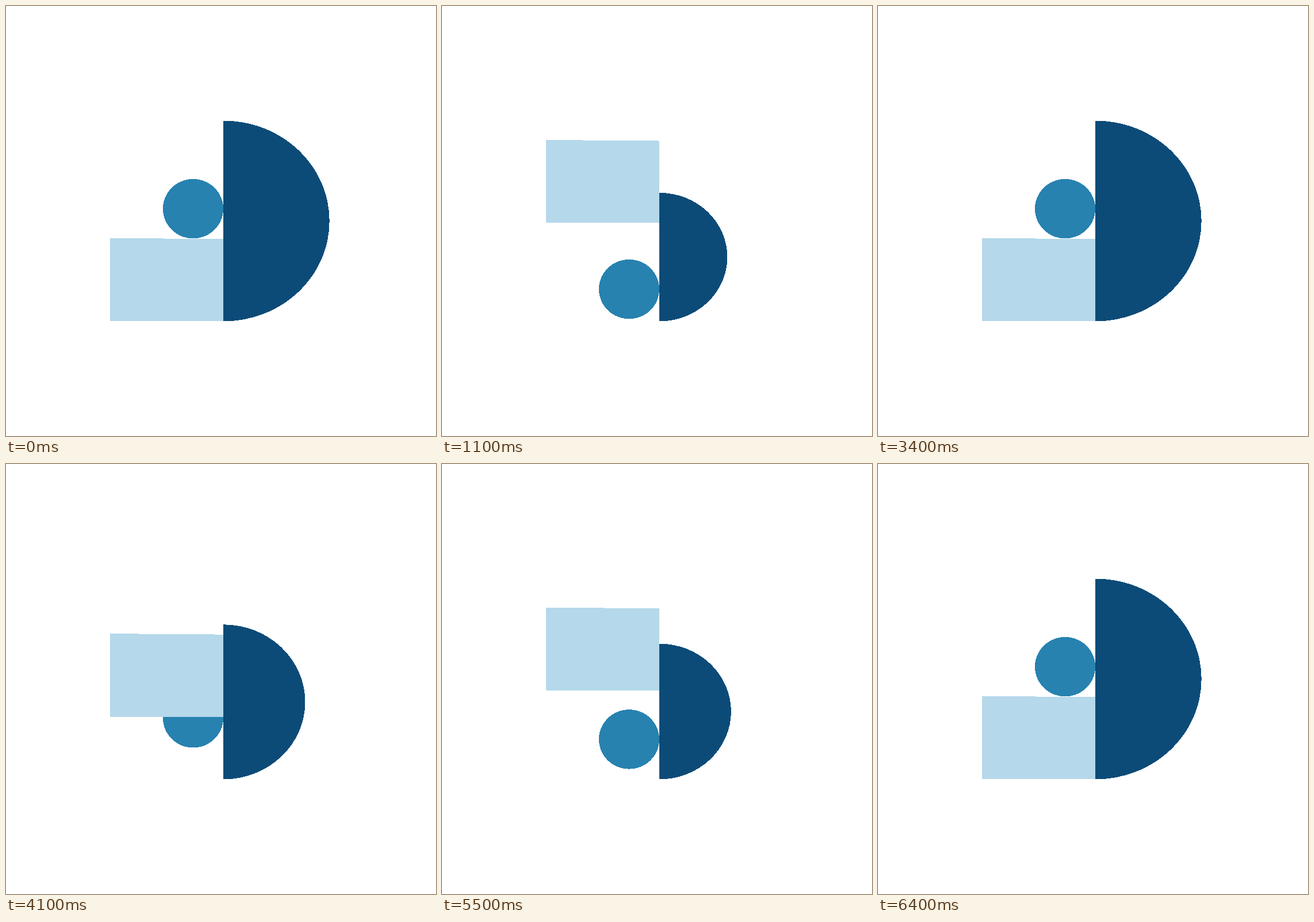
Write an HTML page that moves like this. It is 748 px wide and 748 px high and loops after 6810 ms.

```html
<!DOCTYPE html>
<html lang="en">
<head>
<meta charset="utf-8">
<title>Balancing shapes</title>
<style>
  html, body { margin: 0; width: 100%; height: 100%; overflow: hidden; background: #fff; }
  svg { display: block; width: 100%; height: 100%; }
</style>
</head>
<body>
<svg viewBox="0 0 748 748" shape-rendering="crispEdges">
  <ellipse id="ball" cx="325.5" cy="352.7" rx="52.6" ry="51.7" fill="#2782b0"/>
  <path id="block" d="M181.4 403.8 L378.2 405.3 V548.2 H181.4 Z" fill="#b5d8ea"/>
  <path id="dome" d="M0 0 V-349 A184.5 174.5 0 0 1 0 0 Z" fill="#0c4b78"/>
</svg>
<script>
  const LOOP = 6810, CYCLE = 3400;
  const [ball, block, dome] = ["ball", "block", "dome"].map(id => document.getElementById(id));

  const ease = (t, start, end) => {
    const u = Math.min(1, Math.max(0, (t - start) / (end - start)));
    return u * u * (3 - 2 * u);
  };

  // Two uneven steps per tenth of a second
  const snap = t => Math.floor(t / 100) * 100 + (t % 100 >= 30 ? 33.3 : 0);

  const move = (el, x, y, scale = 1) =>
    el.setAttribute("transform", `translate(${x} ${y}) scale(${scale})`);

  function draw(time) {
    const t = snap(time % LOOP) % CYCLE;
    const p = ease(t, 0, 1200) - ease(t, 1867, 2967);
    move(ball, 0, 142.7 * p);
    move(block, 0, -174.2 * p);
    move(dome, 378.2, 548.5, 1 - 0.3665 * p);
  }

  const begin = performance.now();
  function tick() {
    draw(performance.now() - begin);
    requestAnimationFrame(tick);
  }
  tick();
</script>
</body>
</html>
```
